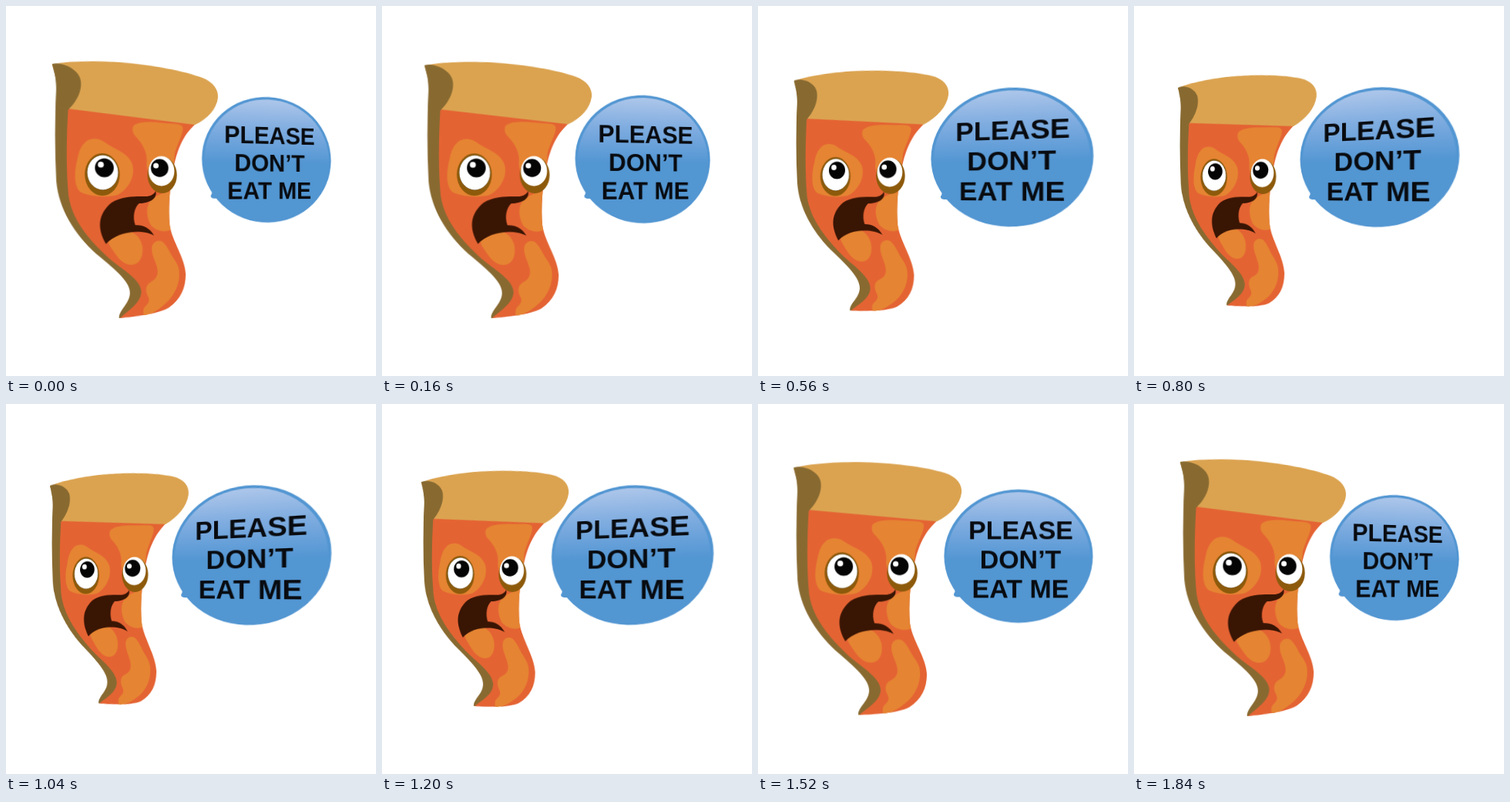
Animation, 480 px wide and 480 px high, one loop 1.92 s. Source, as an HTML page:

```html
<!DOCTYPE html>
<html lang="en">
<head>
<meta charset="utf-8">
<title>Please don’t eat me</title>
<style>
  html, body { margin: 0; width: 100%; height: 100%; overflow: hidden; background: #fff; }
  #card { display: block; width: 480px; height: 480px; transform-origin: 240px 240px; }
  text { font: bold 34px "Liberation Sans", Arial, sans-serif; text-anchor: middle; fill: #080b10; }
  .side { fill: #886a31; }
  .crust { fill: #dba350; }
  .sauce { fill: #e46333; }
  .cheese { fill: #e58432; }
  .lid { fill: #8d5a0b; }
  .dark { fill: #391504; }
</style>
</head>
<body>
<svg id="card" viewBox="0 0 480 480">
  <defs>
    <path id="body" d="M66 130 C63 175 63 215 66 246 C71 280 97 308 123 331 C142 346 159 357 159 371 C158 385 143 393 131 403 C150 402 180 401 196 393 C212 383 219 368 219 350 C218 328 200 306 197 284 C195 262 197 232 203 206 C208 184 216 164 236 148 Z"/>
    <clipPath id="inside"><use href="#body"/></clipPath>
    <linearGradient id="gloss" gradientUnits="userSpaceOnUse" x1="0" y1="114" x2="0" y2="202">
      <stop offset="0" stop-color="#adc6ea"/>
      <stop offset=".45" stop-color="#80ade0"/>
      <stop offset=".85" stop-color="#5f9cd7"/>
      <stop offset="1" stop-color="#5296d2"/>
    </linearGradient>
  </defs>

  <!-- slice -->
  <path class="side" d="M46 83 C48 93 52 99 51 112 C49 150 49 190 51 228 C54 262 73 294 101 320 C127 342 145 358 144 372 C143 386 129 393 130 403 L150 400 L175 360 L90 240 L84 100 Z"/>
  <use class="sauce" href="#body"/>
  <g class="cheese" clip-path="url(#inside)">
    <path d="M77 200 C81 176 95 169 110 177 C124 187 141 190 147 205 C152 222 141 238 128 245 C112 249 95 247 82 242 C72 236 73 215 77 200 Z"/>
    <path d="M148 157 C153 149 175 150 190 151 C200 152 212 150 215 156 C216 164 208 176 204 190 L200 235 C185 235 168 228 166 205 C168 190 160 178 152 170 C147 165 147 161 148 157 Z"/>
    <path d="M199 240 C190 242 178 245 172 252 C164 260 166 275 172 285 C180 293 192 295 200 290 Z"/>
    <path d="M124 294 C145 287 156 296 160 310 C163 325 156 336 145 335 C132 334 125 320 118 310 C114 302 117 298 124 294 Z"/>
    <path d="M173 313 C175 304 185 303 189 308 C194 313 197 320 200 325 C206 334 210 339 210 347 C211 359 206 372 198 381 C189 391 176 399 163 403 C161 398 161 393 164 390 C168 386 171 383 168 377 C164 370 164 362 172 358 C180 354 182 348 180 340 C178 331 172 323 173 313 Z"/>
  </g>
  <path class="crust" d="M46 83 C58 78 95 75 130 75 C175 76 215 81 242 89 C258 94 265 104 264 115 C262 130 250 143 232 152 L65 137 Z"/>
  <path class="side" d="M46 82 C59 79 75 86 80 97 C85 110 77 127 66 138 L50 138 C52 111 51 99 46 82 Z"/>

  <!-- face -->
  <ellipse class="lid" cx="108.5" cy="219" rx="22.3" ry="27"/>
  <ellipse class="lid" cx="187" cy="219" rx="19.8" ry="24"/>
  <ellipse cx="109" cy="216.5" rx="19.6" ry="22"/>
  <ellipse cx="109" cy="216.5" rx="19.6" ry="22" fill="#fff"/>
  <ellipse cx="186" cy="214" rx="17.4" ry="19.5" fill="#fff"/>
  <g fill="#050505">
    <circle cx="111" cy="210.5" r="12"/>
    <circle cx="183.5" cy="210" r="11.8"/>
  </g>
  <g fill="#fff">
    <circle cx="106.5" cy="206.5" r="3.8"/>
    <circle cx="178.5" cy="207" r="3.6"/>
  </g>
  <path class="dark" d="M113 307.5 C102 288 102 270 120 255 C134 246 153 247 167 247 C173 246 177 243 178 240 C181 249 171 256 156 256 C150 261 147 273 151 284 C162 284 170 288 176 298 C160 289 128 291 113 307.5 Z"/>

  <!-- bubble -->
  <path d="M250 230 C256 238 257 242 254 246 C253 251 262 251 268 248 L284 240 Z" fill="#5296d2"/>
  <ellipse cx="338" cy="197" rx="96.6" ry="86.5" fill="#5296d2"/>
  <ellipse cx="338" cy="197" rx="93" ry="83" fill="url(#gloss)"/>
  <text x="341" y="175.5">PLEASE</text>
  <text x="340.5" y="213">DON’T</text>
  <text x="340.5" y="251.3">EAT ME</text>
</svg>
<script>
  const card = document.getElementById("card");
  const STEP = 80, POSES = 12;

  // Card turned about its upright axis; m runs from 1 to -1 over a swing.
  function turn(m) {
    const sx = 1.014 - 0.02 * m - 0.079 * m * m + 0.016 * m ** 3;
    const sy = 1.004 - 0.0305 * m * m;
    const depth = 0.00053 * m - 0.00018;
    const dx = 19.3 * m - 6.5;
    const dy = 0.6 - 0.6 * m;
    return `matrix3d(${[sx, 0, 0, depth.toFixed(7), 0, sy, 0, 0, 0, 0, 1, 0, dx, dy, 0, 1]})`;
  }

  function draw() {
    const n = Math.floor(performance.now() / STEP) % (2 * POSES);
    const pose = n < POSES ? n : 2 * POSES - 1 - n;
    card.style.transform = turn(Math.cos(Math.min(Math.PI, 0.306 * pose)));
    requestAnimationFrame(draw);
  }
  draw();
</script>
</body>
</html>
```
